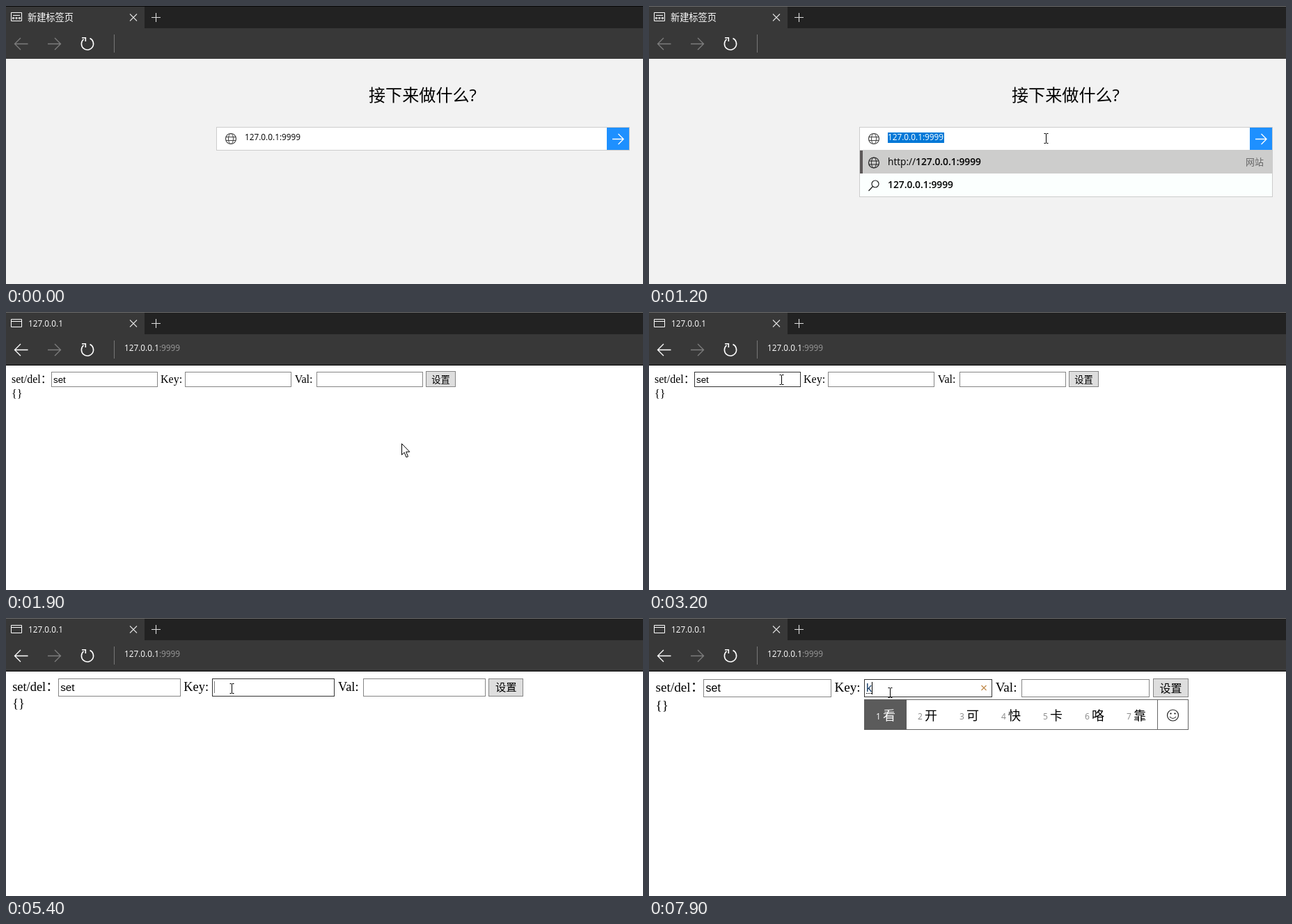
Recreate the animation shown at these times as an HTML page. Size 915 by 400 pixels, loop 8 s.

```html
<!DOCTYPE html>
<html lang="zh-CN">
<head>
<meta charset="utf-8">
<title>127.0.0.1</title>
<style>
html, body { margin: 0; width: 100%; height: 100%; overflow: hidden; background: #383838; }
svg { display: block; width: 100vw; height: 100vh; }
text { white-space: pre; }
.ui { font-family: "Open Sans", "Noto Sans CJK SC", "Noto Sans CJK", sans-serif; }
.serif { font-family: "Liberation Serif", "Noto Sans CJK SC", serif; }
.sans { font-family: "Liberation Sans", "Noto Sans CJK SC", sans-serif; }
</style>
</head>
<body>
<svg id="stage" viewBox="0 0 915 400"></svg>
<script>
const LOOP = 8000, TICK = 100;
const stage = document.getElementById('stage');

// Pointer waypoints: time, x, y
const POINTER = [
  [100, 905, 50], [700, 570, 190], [1700, 570, 190], [1800, 568, 189], [2300, 568, 189],
  [3200, 190, 97], [3500, 317, 97], [3600, 317, 97], [4000, 323, 100], [5300, 323, 100],
  [5700, 327, 106], [5800, 327, 106], [6500, 346, 107]
];
// Page zoom: start time, factor
const ZOOM = [[0, 1], [4300, 1.05], [4700, 1.1], [5000, 1.15], [5900, 1.2]];
// Caret opacity: start time, value
const CARET = [
  [0, 0], [3700, 1], [5400, .5], [5500, 0], [5900, .5], [6000, 1],
  [6400, .5], [6500, 0], [6900, .5], [7000, 1], [7400, .5], [7500, 0], [7900, 1]
];

const stepAt = (steps, t) => steps.filter(s => s[0] <= t).pop()[1];

function pointerAt(t) {
  const next = POINTER.findIndex(p => p[0] > t);
  if (next < 0) return POINTER[POINTER.length - 1].slice(1);
  const b = POINTER[next], a = POINTER[Math.max(0, next - 1)];
  const k = a === b ? 0 : (t - a[0]) / (b[0] - a[0]);
  const e = k * k * (3 - 2 * k);
  return [1, 2].map(i => Math.round(a[i] + (b[i] - a[i]) * e));
}

const box = (x, y, w, h, fill) =>
  `<rect x="${x}" y="${y}" width="${w}" height="${h}" fill="${fill}"/>`;
const frame = (x, y, w, h, fill, stroke) =>
  `<rect x="${x + .5}" y="${y + .5}" width="${w - 1}" height="${h - 1}" fill="${fill}" stroke="${stroke}"/>`;
const path = (d, stroke, width = 1, fill = 'none') =>
  `<path d="${d}" stroke="${stroke}" stroke-width="${width}" fill="${fill}"/>`;
const text = (x, y, size, str, fill = '#000', cls = 'ui', weight = 400) =>
  `<text x="${x}" y="${y}" font-size="${size}" fill="${fill}" class="${cls}" font-weight="${weight}">${str}</text>`;
const group = (x, y, body, opacity = 1) =>
  `<g transform="translate(${x} ${y})" opacity="${opacity}">${body}</g>`;

const globe = (y, color) => group(323, y,
  `<circle r="7.5" fill="none" stroke="${color}" stroke-width="1.2"/>
   <ellipse rx="3.5" ry="7.5" fill="none" stroke="${color}"/>` +
  path('M-7-2.5H7M-7 2.5H7', color));

const beam = path('M-3-7h2.5M.5-7h2.5M0-6.5V6.5M-3 7h2.5M.5 7h2.5', '#000');
const arrow = path('M0 0V16L3.7 12.6L6.5 19.5L9 18.5L6.2 11.7H11.3Z', '#000', 1, '#fff');

function chrome(t) {
  const loading = t >= 1800 && t < 1900, loaded = t >= 1900;
  let s = box(0, 0, 915, 32, '#222') + box(0, 0, 915, 1, t < 800 ? '#080808' : '#6b6b6b') +
    box(0, 1, 199, 31, '#383838') + box(0, 32, 915, 44, '#383838');
  if (loading) s += box(12, 23, 2, 2, '#999');
  else if (loaded) s += path('M7.5 10.5h15v11h-15zM7.5 13.5h15', '#fff');
  else s += path('M7.5 9.5h15v12h-15zM10 13.5h10M9.5 16.5h2v2h-2zM14 16.5h2v2h-2zM18.5 16.5h2v2h-2z', '#fff');
  s += loaded ? text(32, 21, 11.8, '127.0.0.1', '#fff') : text(31, 21, 13.2, '新建标签页', '#fff');
  s += path('M178 11.5l10 10M188 11.5l-10 10M209 16.5h13M215.5 10v13', '#ddd', 1.1);
  s += path('M31.5 54.5H12.5M21 46l-8.5 8.5L21 63', loaded ? '#fff' : '#7d7d7d', 1.3);
  s += path('M60 54.5H79M70 46l8.5 8.5L70 63', '#7d7d7d', 1.3);
  s += loading
    ? path('M109.500 46.500l15 15M124.500 46.500l-15 15', '#fff', 1.7)
    : path('M120.5 46.600A8.600 8.600 0 1 1 111.5 47.800M109 45.700H114.300V51', '#fff', 1.6);
  s += box(155, 41, 1, 26, '#777');
  if (t >= 1800)
    s += text(170, 56, 11.8, '127.0.0.1<tspan fill="#999">:9999</tspan>', '#fff');
  return s;
}

function suggestions(opacity) {
  return group(0, 0,
    frame(302, 207, 594, 68, '#fbfffe', '#ccc') + box(303, 208, 592, 33, '#cdcdcc') +
    box(303, 208, 4, 33, '#5c5858') + globe(225.5, '#222') +
    text(343, 229, 13.7, 'http://') + text(383, 229, 13.8, '127.0.0.1:9999', '#000', 'ui', 600) +
    text(857, 229, 13, '网站', '#666') +
    '<circle cx="325" cy="256" r="5" fill="none" stroke="#222" stroke-width="1.2"/>' +
    path('M321.300 259.700L315.500 266', '#222', 1.3) +
    text(343, 262, 13.8, '127.0.0.1:9999', '#000', 'ui', 600), opacity);
}

function newTab(t) {
  const selected = t >= 800;
  let s = box(0, 76, 915, 324, '#f2f2f2') + text(521, 137, 24.1, '接下来做什么?') +
    frame(302, 174, 594, 34, '#fff', '#ccc') + box(863, 175, 32, 32, '#1e90ff') +
    path('M871 191.500h16M879.500 184l7.500 7.500l-7.500 7.500', '#fff', 1.3) + globe(191, '#444');
  if (selected) s += box(343, 182, 81, 15, '#0078d7');
  s += text(343, 193, 11.8, '127.0.0.1:9999', selected ? '#fff' : '#000');
  if (t >= 1100) s += suggestions(t < 1200 ? .6 : 1);
  return s;
}

function candidates() {
  let s = frame(309, 117, 466, 44, '#fff', '#666') + box(309, 117, 61, 44, '#5b5b5b') +
    box(730, 118, 1, 42, '#666');
  [...'看开可快卡咯靠'].forEach((word, i) => {
    const x = 326 + 60 * i;
    s += text(x, 146, 12, i + 1, i ? '#888' : '#fff') + text(x + 10, 147, 18, word, i ? '#000' : '#fff');
  });
  return s + group(752.5, 140,
    '<circle r="8" fill="none" stroke="#222" stroke-width="1.2"/>' +
    '<circle cx="-3" cy="-2.500" r="1.100"/><circle cx="3" cy="-2.500" r="1.100"/>' +
    path('M-4.500 2Q0 7 4.500 2', '#222', 1.1));
}

function formPage(t, px, py) {
  const z = stepAt(ZOOM, t), X = v => Math.round(v * z), Y = v => Math.round(77 + v * z);
  const top = Y(9), bottom = Y(31), focused = t >= 3700;
  const label = (x, y, str) => text(x * z, Y(y), 16 * z, str, '#000', 'serif');
  let over = false;
  let s = box(0, 76, 915, 1, '#000') + box(0, 77, 915, 323, '#fff') +
    label(8, 24.5, 'set/del') + label(49.8, 24.5, '：') +
    label(222, 24.5, 'Key:') + label(414.7, 24.5, 'Val:') + label(8, 45.5, '{}');
  [65, 257.4, 446].forEach((left, i) => {
    const x = X(left), w = X(153);
    const hover = px >= x && px < x + w && py >= top && py < bottom;
    over = over || hover;
    s += frame(x, top, w, bottom - top, '#fff', hover || focused && i === 1 ? '#333' : '#858585');
  });
  s += text(68 * z, Y(24.5), 13.33 * z, 'set', '#000', 'sans') +
    frame(X(603), Y(8.3), X(646) - X(603), bottom - Y(8.3), '#dedede', '#858585') +
    text(611.3 * z, Y(24.7), 13.33 * z, '设置', '#000', 'sans');
  const typed = t >= 7900;
  if (typed) {
    s += text(312, 106, 16, 'k', '#123a66', 'sans') +
      `<path d="M312 108.500h8" stroke="#333" stroke-dasharray="2 1"/>` +
      path('M477.500 97l7 7M484.500 97l-7 7', '#c08a4a', 1.2) + candidates();
  }
  const caretX = typed ? 320 : X(257.4) + 3;
  s += group(caretX, top + 4, box(0, 0, 1, Math.round(15 * z), '#000'), stepAt(CARET, t));
  return [s, over];
}

function scene(t) {
  const [px, py] = pointerAt(t);
  let page, over = false;
  if (t < 1800) {
    page = newTab(t);
    over = px > 302 && px < 863 && py > 174 && py < 208;
  } else if (t < 1900) {
    page = box(0, 76, 915, 324, '#383838') + box(0, 76, 915, 1, '#000');
  } else {
    [page, over] = formPage(t, px, py);
  }
  const pointer = t < 200 ? '' : group(px + .5, py + .5, over ? beam : arrow);
  return chrome(t) + page + pointer;
}

let shown = -1;
function draw(now) {
  const t = Math.floor(now % LOOP / TICK) * TICK;
  if (t !== shown) stage.innerHTML = scene(shown = t);
  requestAnimationFrame(draw);
}
draw(performance.now());
</script>
</body>
</html>
```
